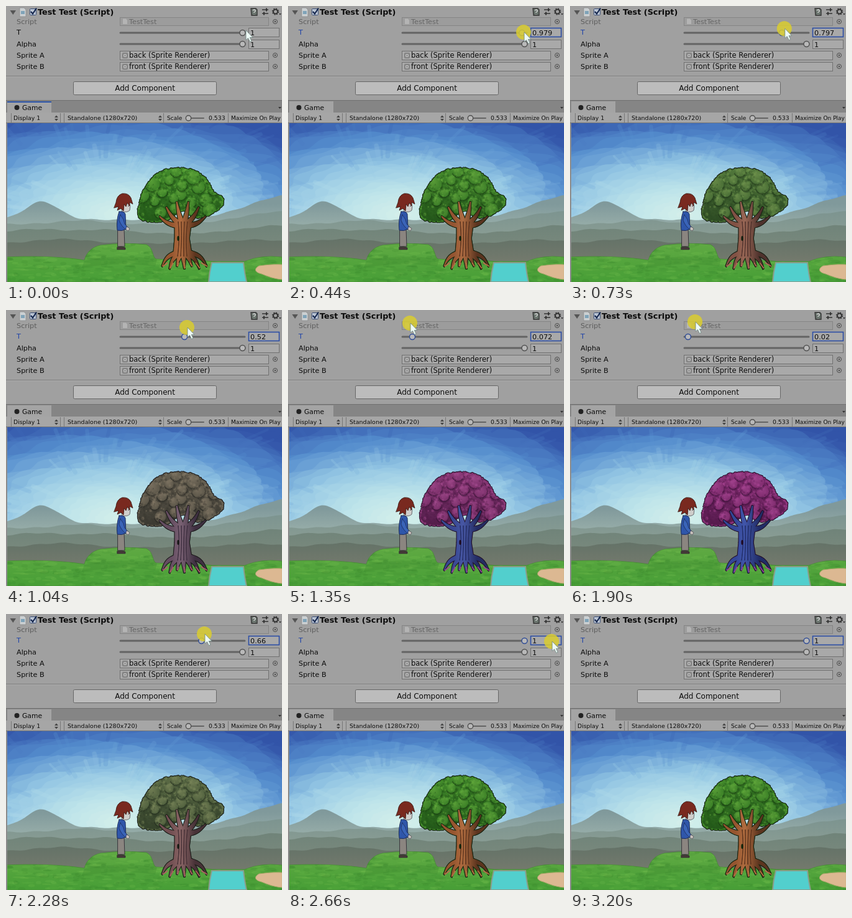
Animation of 444 by 443 pixels, one loop 3.27 s. Source, as an HTML page with a canvas:

```html
<!DOCTYPE html>
<html lang="en">
<head>
<meta charset="utf-8">
<title>Tree blend</title>
<style>
html, body { margin: 0; width: 100%; height: 100%; overflow: hidden; background: #a0a0a0; }
canvas, svg { position: absolute; left: 0; top: 0; width: 444px; height: 443px; }
text { font-family: "DejaVu Sans", Verdana, sans-serif; font-size: 11.25px; fill: #0c0c0c; }
.title { font-size: 12.8px; font-weight: bold; }
.slot { font-size: 11.5px; }
.bar text { font-size: 9.3px; }
.bar .small { font-size: 9px; }
.field { fill: #a9a9a9; stroke: #707070; }
.dim { fill: #9c9c9c; stroke: #858585; }
.track { stroke: #646464; stroke-width: 3; stroke-linecap: round; }
.knob { fill: #b9b9b9; stroke: #505050; stroke-width: 1.4; }
.focus .label { fill: #2144a8; }
.focus .value { stroke: #2c4ea6; stroke-width: 1.6; }
.focus .knob { stroke: #2f4c96; }
</style>
</head>
<body>
<canvas id="scene" width="444" height="443"></canvas>
<canvas id="back" width="444" height="443"></canvas>
<canvas id="front" width="444" height="443"></canvas>
<svg viewBox="0 0 444 443">
  <rect width="444" height="188" fill="#a0a0a0"/>
  <rect y="188" width="2" height="255" fill="#8d8d8d"/>

  <path d="M6.500 7H16L11.300 14Z" fill="#555"/>
  <path d="M22 3H29L32 6V17H22Z" fill="#ccd0d2" stroke="#888" stroke-width=".7"/>
  <rect x="24" y="8" width="6" height="5" fill="#7fa3b8"/>
  <rect x="38.500" y="4.500" width="10" height="10" rx="1" fill="#bcc6d4" stroke="#3c5078"/>
  <path d="M40 9L43 12.500L49 3.500" fill="none" stroke="#14264e" stroke-width="2.200"/>
  <text class="title" x="51" y="14">Test Test (Script)</text>
  <g fill="none" stroke="#333" stroke-width="1.300">
    <path d="M394 4H402L404 6V15H395Z" fill="#68726c"/>
    <path d="M397 7q3-2 4 0t-2 3v1M399 13v.5" stroke="#ddd"/>
    <path d="M412 6H422M412 12H422" />
    <path d="M419 3.500V8.500M415 9.500V14.500" stroke-width="2"/>
    <circle cx="433.500" cy="9" r="3.500" stroke-width="2"/>
    <circle cx="433.500" cy="9" r="5" stroke-dasharray="2 1.930"/>
    <path d="M439 12H443L441 14.500Z" fill="#333" stroke="none"/>
  </g>

  <rect class="field dim" x="183.500" y="18.500" width="239" height="13"/>
  <path d="M188 20.500H193L195 23V29H188Z" fill="#b4b4b4"/>
  <text x="17" y="29" style="fill:#5e5e5e">Script</text>
  <text x="198" y="29" style="fill:#666">TestTest</text>

  <g id="tRow">
    <text class="label" x="17" y="46">T</text>
    <path class="track" d="M184 43H384"/>
    <circle class="knob" id="knob" cy="43" r="4.500"/>
    <rect class="field value" x="390.500" y="35.500" width="49" height="14"/>
    <text id="value" x="393" y="47"></text>
  </g>
  <text x="17" y="65">Alpha</text>
  <path class="track" d="M184 61H384"/>
  <circle class="knob" cx="380.500" cy="61" r="4.500"/>
  <rect class="field" x="390.500" y="54.500" width="49" height="14"/>
  <text x="393" y="66">1</text>

  <text x="17" y="83">Sprite A</text>
  <text x="17" y="101">Sprite B</text>
  <g id="slots"></g>
  <text class="slot" x="198" y="83">back (Sprite Renderer)</text>
  <text class="slot" x="198" y="101">front (Sprite Renderer)</text>

  <path d="M0 112.500H444" stroke="#7d7d7d"/>
  <path d="M0 113.500H444" stroke="#adadad"/>
  <rect x="108.500" y="121.500" width="230" height="21" rx="2" fill="#bcbcbc" stroke="#666"/>
  <text x="223.500" y="136" text-anchor="middle" style="font-size:12px">Add Component</text>

  <g class="bar">
    <rect y="151" width="444" height="20" fill="#858585"/>
    <path d="M0 151.500H444" stroke="#707070"/>
    <rect x="2" y="153" width="71" height="19" fill="#a4a4a4"/>
    <path id="tabLine" d="M2 154H73" stroke="#2d55a8" stroke-width="2"/>
    <circle cx="17.500" cy="163" r="4" fill="#222"/>
    <text x="26" y="167" style="font-size:10.8px">Game</text>
    <path d="M438 162H443L440.500 165Z" fill="#333"/>
    <rect y="171" width="444" height="17" fill="#a6a6a6"/>
    <path d="M0 187.500H444M8.500 172V187M87.500 172V187M93.500 172V187M253.500 172V187M357.500 172V187" stroke="#777"/>
    <path d="M78 179L81 175.500L84 179ZM78 181L81 184.500L84 181ZM245 179L248 175.500L251 179ZM245 181L248 184.500L251 181Z" fill="#444"/>
    <text x="12" y="183">Display 1</text>
    <text x="99" y="183" style="font-size:9.500px">Standalone (1280x720)</text>
    <text class="small" x="259" y="183">Scale</text>
    <path class="track" d="M290 180H318" style="stroke-width:2"/>
    <circle class="knob" cx="293.500" cy="180" r="4.200"/>
    <text x="326" y="183">0.533</text>
    <text class="small" x="362" y="183">Maximize On Play</text>
  </g>

  <g id="pointer">
    <circle id="press" r="12" fill="#d9cd2f" opacity=".85"/>
    <path d="M1 0V15.500L4.500 12.500L7.500 18.500L10 17.300L7.300 11.500H12Z" fill="#eefaf6" stroke="#6e8580" stroke-width=".8"/>
  </g>
</svg>
<script>
const LOOP = 3270, PRESS = 190;
const TAU = Math.PI * 2;
const $ = id => document.getElementById(id);
const clamp = (v, lo, hi) => Math.min(hi, Math.max(lo, v));
const mix = (a, b, u) => a + (b - a) * u;

function seeded(s) {
  return () => {
    s = (s + 0x6D2B79F5) | 0;
    let r = Math.imul(s ^ (s >>> 15), 1 | s);
    r = (r + Math.imul(r ^ (r >>> 7), 61 | r)) ^ r;
    return ((r ^ (r >>> 14)) >>> 0) / 4294967296;
  };
}

// Closed smooth curve through a few points, as a dense list
function curve(pts, n = 10) {
  const at = i => pts[(i + pts.length) % pts.length];
  return pts.flatMap((_, i) => Array.from({ length: n }, (_, j) => {
    const u = j / n;
    return [0, 1].map(k => {
      const [a, b, c, d] = [-1, 0, 1, 2].map(o => at(i + o)[k]);
      return b + u * (c - a) / 2 + u * u * (a - 2.5 * b + 2 * c - d / 2) + u ** 3 * (1.5 * (b - c) + (d - a) / 2);
    });
  }));
}

function outline(pts) {
  const p = new Path2D();
  pts.forEach(([x, y]) => p.lineTo(x, y));
  p.closePath();
  return p;
}

function paint(g, d, fill, line, width = 1) {
  const p = new Path2D(d);
  g.fillStyle = fill;
  g.fill(p);
  if (line) {
    g.strokeStyle = line;
    g.lineWidth = width;
    g.stroke(p);
  }
  return p;
}

function dot(g, x, y, r, color, ry = r) {
  g.beginPath();
  g.ellipse(x, y, r, ry, 0, 0, TAU);
  g.fillStyle = color;
  g.fill();
}

function fade(g, y0, y1, top, bottom) {
  const f = g.createLinearGradient(0, y0, 0, y1);
  f.addColorStop(0, top);
  f.addColorStop(1, bottom);
  return f;
}

function drawSky(g) {
  const tones = [[214, 240, 234], [190, 228, 234], [150, 200, 228], [84, 140, 205], [50, 84, 168]];
  const tone = f => {
    const s = clamp(f, 0, .999) * 4, i = Math.floor(s);
    return `rgb(${tones[i].map((v, k) => Math.round(mix(v, tones[i + 1][k], s - i)))})`;
  };
  const spot = (r, a) => [185 + 390 * r * Math.cos(a), 335 + 170 * r * Math.sin(a)];
  const rnd = seeded(3);
  g.fillStyle = tone(1);
  g.fillRect(0, 188, 444, 255);
  for (let f = 1.05; f > 0; f -= .035) {
    const ring = [];
    for (let a = 0; a < TAU; a += .03) {
      ring.push(spot(f * (1 + .03 * Math.sin(9 * a + 40 * f) + .02 * Math.sin(23 * a + 70 * f)), a));
    }
    paint(g, outline(ring), tone(f));
  }
  // Brush strokes that run out from the glow
  g.globalAlpha = .3;
  g.lineCap = 'round';
  for (let i = 0; i < 110; i++) {
    const a = Math.PI * (1 + rnd()), r = .35 + rnd() * .75;
    g.strokeStyle = tone(r + rnd() * .16 - .08);
    g.lineWidth = 3 + rnd() * 5;
    g.beginPath();
    g.moveTo(...spot(r - .08, a));
    g.lineTo(...spot(r + .08, a + .03));
    g.stroke();
  }
  g.globalAlpha = 1;
}

function drawHills(g) {
  const ridge = (base, peaks, top, bottom) => {
    const pts = [[444, 443], [0, 443]];
    for (let x = 0; x <= 444; x += 3) {
      const rise = peaks.reduce((sum, [c, h, w]) => sum + h * Math.exp(-(((x - c) / w) ** 2)), 0);
      pts.push([x, base - rise + .8 * Math.sin(x / 7 + base)]);
    }
    paint(g, outline(pts), fade(g, base - 25, base + 30, top, bottom));
  };
  ridge(343, [[58, 29, 38], [460, 40, 95]], '#80999b', '#a3b8b0');
  ridge(350, [[120, 6, 50], [444, 20, 90]], '#7b938f', '#8d9f95');
  ridge(365, [[50, 7, 60], [160, 6, 50], [444, 13, 80]], '#6d8278', '#7b8a7e');
  ridge(381, [[90, 7, 60], [400, 6, 60]], '#5d6f65', '#747a6d');
}

function drawGround(g) {
  const rnd = seeded(5);
  const grass = 'M0 403C40 401 90 402 126 408C129 397 137 387 152 384Q190 379 226 383C237 388 235 402 241 406C270 408 300 406 332 410H384Q410 399 444 403V443H0Z';
  g.save();
  g.clip(paint(g, grass, fade(g, 380, 443, '#60aa43', '#479e36'), '#4b8c3a'));
  for (let i = 0; i < 420; i++) {
    g.globalAlpha = .08 + rnd() * .12;
    dot(g, rnd() * 444, 380 + rnd() * 63, 3 + rnd() * 8, rnd() < .5 ? '#2c7625' : '#84ca58', 1 + rnd() * 2);
  }
  g.globalAlpha = .25;
  paint(g, 'M126 409Q185 396 243 407L240 418Q180 410 122 420Z', '#357f2b');
  g.restore();
  paint(g, 'M331 412H382Q384 430 387 443H326Q327 428 331 412Z', '#52cfcd', '#8b9d8c', 2);
  paint(g, 'M444 415C430 414 415 416 407 417C397 423 402 428 411 430C421 434 431 438 444 439Z', '#dcb892', '#a7a767');
}

function drawPerson(g) {
  const ink = '#26212b', navy = '#1a2750';
  paint(g, 'M180 358H190L191 386H180Z', '#8b8580', ink, .8);
  paint(g, 'M179 387Q186 385 192 388V391H179Z', '#453a38', ink, .6);
  paint(g, 'M184 316H198Q201 322 199 328Q195 332 187 330Z', '#cfcecb', ink, .6);
  paint(g, 'M182 330Q190 329 192 334L193 358Q187 362 179 360Q177 344 182 330Z', '#2f56aa', navy, .9);
  paint(g, 'M184 335Q190 342 191 350L196 355L193 359Q185 353 182 344Z', '#3a64b8', navy, .7);
  paint(g, 'M194 354L199 357L197 361L193 359Z', '#cac3be', ink, .5);
  paint(g, 'M177 315Q178 304 187 301Q197 300 201 308L204 318L199 315V321L195 316L193 322L190 318L189 329L185 325L179 328L181 322L174 324Z', '#79291f', '#35130f', .8);
  dot(g, 197, 321, .8, ink);
}

// Tapered limb as a polygon, bent sideways by a share of its length
function limb(x0, y0, x1, y1, w0, w1, bend = 0) {
  const dx = x1 - x0, dy = y1 - y0, len = Math.hypot(dx, dy), left = [], right = [];
  for (let u = 0; u <= 1.001; u += .1) {
    const b = bend * Math.sin(Math.PI * u), w = mix(w0, w1, u) / 2 / len;
    const x = x0 + dx * u - dy * b, y = y0 + dy * u + dx * b;
    left.push([x - dy * w, y + dx * w]);
    right.unshift([x + dy * w, y - dx * w]);
  }
  return outline([...left, ...right]);
}

function drawTrunk(g, c) {
  const roots = Array.from({ length: 7 }, (_, i) => limb(276 + i * 3, 396, 251 + i * 12, 418 + (i % 2) * 4, 9, 1.5, (3 - i) * .05));
  const branches = Array.from({ length: 6 }, (_, i) => {
    const a = Math.PI * (1.12 + .152 * i);
    return limb(281 + i * 1.5, 352, 284 + 40 * Math.cos(a), 352 + 39 * Math.sin(a), 10, 2, (i - 2.5) * .05);
  });
  const stem = [limb(284, 400, 283, 372, 30, 23), limb(283, 374, 285, 344, 23, 27)];
  const parts = [...roots, ...branches, ...stem];
  const bark = g.createLinearGradient(266, 0, 304, 0);
  bark.addColorStop(0, c.bark);
  bark.addColorStop(.4, c.barkLight);
  bark.addColorStop(1, c.barkDark);
  g.lineJoin = 'round';
  parts.forEach(p => paint(g, p, c.ink, c.ink, 2));
  parts.forEach(p => paint(g, p, bark));
  roots.forEach((p, i) => {
    g.strokeStyle = c.root;
    g.lineWidth = 1.6;
    g.beginPath();
    g.moveTo(260 + i * 9, 412);
    g.lineTo(252 + i * 12, 418 + (i % 2) * 3);
    g.stroke();
  });
  g.strokeStyle = c.barkDark;
  g.lineWidth = 1;
  for (let x = 276; x < 296; x += 5) g.stroke(limb(x + 1, 346, x, 402, .3, .3, (x - 284) * .004));
  dot(g, 277, 373, 1.7, c.ink, 4);
}

const CROWN = [[214, 337], [218, 306], [230, 283], [250, 266], [277, 261], [304, 265], [323, 280], [333, 298], [348, 309], [345, 323], [323, 336], [303, 338], [284, 328], [262, 341], [236, 346]];

function drawTree(g, c) {
  const rnd = seeded(11), edge = curve(CROWN), crown = outline(edge);
  const tufts = edge.map(p => [...p, .6 + rnd() * 1.6]);
  tufts.forEach(([x, y, r]) => dot(g, x, y, r + .7, c.ink));
  paint(g, crown, fade(g, 262, 348, c.leaf, c.shade));
  tufts.forEach(([x, y, r]) => dot(g, x, y, r - .2, c.leaf));

  g.save();
  g.clip(crown);
  const speckle = (n, alpha) => {
    g.globalAlpha = alpha;
    for (let i = 0; i < n; i++) {
      const y = 258 + rnd() * 90;
      dot(g, 211 + rnd() * 140, y, .7 + rnd() * 2, rnd() < (345 - y) / 120 ? c.light : c.shade);
    }
    g.globalAlpha = 1;
  };
  speckle(700, .4);
  // Leaf clumps on a sunflower spiral
  for (let i = 0; i < 19; i++) {
    const a = i * 2.4, d = Math.sqrt(i / 19);
    const x = 281 + 66 * d * Math.cos(a), y = 302 + 42 * d * Math.sin(a), r = 7 + rnd() * 5;
    g.globalAlpha = .5;
    dot(g, x + 1, y + 3, r + 1, c.shade);
    const glow = g.createRadialGradient(x - r * .3, y - r * .5, 1, x, y, r);
    glow.addColorStop(0, c.light);
    glow.addColorStop(1, c.leaf);
    g.globalAlpha = .75;
    dot(g, x, y, r, glow);
    g.strokeStyle = c.ink;
    g.lineWidth = .8;
    g.globalAlpha = .6;
    for (let b = rnd(); b < 2.8; b += .38) {
      g.beginPath();
      g.arc(x + r * Math.cos(b), y + r * Math.sin(b), 1.7, b - 1.3, b + 1.3);
      g.stroke();
    }
  }
  speckle(450, .35);
  g.restore();
  drawTrunk(g, c);
}

const ctx = id => $(id).getContext('2d');
const scene = ctx('scene');
[drawSky, drawHills, drawGround, drawPerson].forEach(draw => draw(scene));
drawTree(ctx('back'), { leaf: '#8c2f79', light: '#b0479a', shade: '#57194f', ink: '#210b25', bark: '#31469a', barkLight: '#3f56ad', barkDark: '#202d69', root: '#a23c98' });
drawTree(ctx('front'), { leaf: '#428a2b', light: '#66ae3e', shade: '#235819', ink: '#13270d', bark: '#96552f', barkLight: '#b06d40', barkDark: '#5c341e', root: '#b87443' });

$('slots').innerHTML = [72.5, 90.5].map(y => `
  <rect class="field" x="183.5" y="${y}" width="239" height="14"/>
  <rect x="187.5" y="${y + 3}" width="8" height="8" rx="1" fill="#8f8f8f" stroke="#777"/>
  <circle cx="191.5" cy="${y + 7}" r="2" fill="none" stroke="#ccc"/>`).join('') +
  [25, 79, 97].map(y => `
  <circle cx="433" cy="${y}" r="3.5" fill="none" stroke="#4a4a4a"/>
  <circle cx="433" cy="${y}" r="1.2" fill="#4a4a4a"/>`).join('');

// One drag to the left and back: time, pointer x, pointer y, slider (held within 0 and 1)
const DRAG = [
  [0, 385, 39, 1.01],
  [440, 379, 42, .979],
  [1040, 291, 28, .52],
  [1350, 196, 21, .072],
  [1600, 155, 14, -.18],
  [1900, 201, 19, .02],
  [2280, 319, 32, .66],
  [2740, 444, 46, 1.3],
  [2900, 470, 47, 1.4]
];

// Smooth curve through the rows at uneven times
function follow(rows, t, col) {
  const last = rows.length - 1;
  const i = clamp(rows.findLastIndex(r => r[0] <= t), 0, last - 1);
  const slope = k => {
    const a = rows[Math.max(0, k - 1)], b = rows[Math.min(last, k + 1)];
    return (b[col] - a[col]) / (b[0] - a[0]);
  };
  const a = rows[i], b = rows[i + 1], span = b[0] - a[0];
  const u = clamp((t - a[0]) / span, 0, 1), v = 1 - u;
  return v * v * (1 + 2 * u) * a[col] + u * u * (3 - 2 * u) * b[col] + u * v * span * (v * slope(i) - u * slope(i + 1));
}

function render(t) {
  const blend = clamp(follow(DRAG, t, 3), 0, 1), pressed = t >= PRESS;
  $('front').style.opacity = blend;
  $('knob').setAttribute('cx', 186 + 194.5 * blend);
  $('value').textContent = String(+blend.toFixed(3));
  $('tRow').classList.toggle('focus', pressed);
  $('tabLine').style.display = pressed ? 'none' : '';
  $('press').style.display = pressed ? '' : 'none';
  $('pointer').setAttribute('transform', `translate(${follow(DRAG, t, 1)} ${follow(DRAG, t, 2)})`);
}

const start = performance.now();
function loop() {
  const t = Math.max(0, performance.now() - start) % LOOP;
  render(Math.floor(t / 10) * 10);
  requestAnimationFrame(loop);
}
loop();
</script>
</body>
</html>
```
